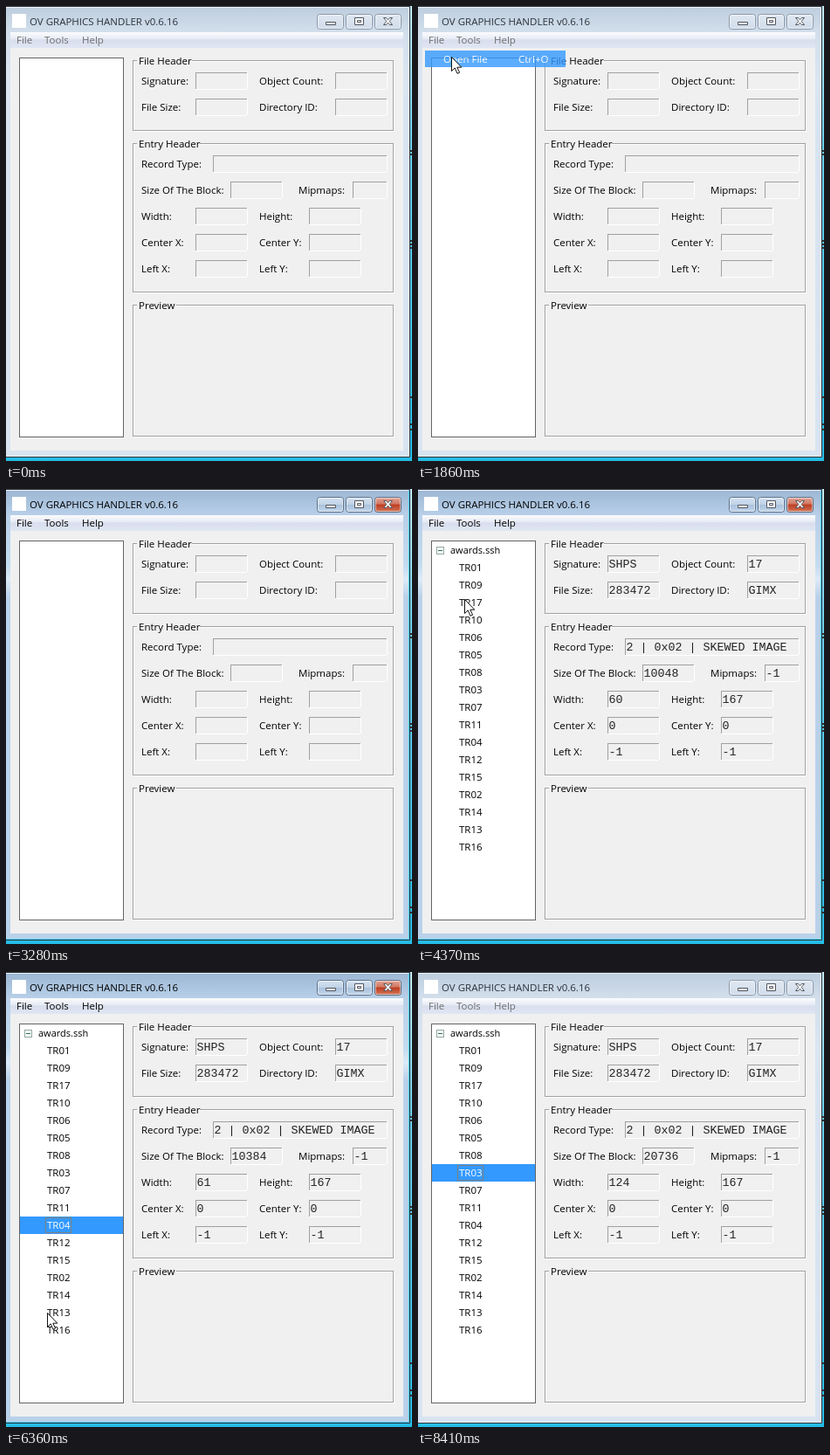
An HTML page for the animation above (8.48 s loop, 465x521 px).

```html
<!DOCTYPE html>
<html>
<head>
<meta charset="utf-8">
<style>
html, body { margin: 0; width: 100%; height: 100%; overflow: hidden; }
svg { display: block; }
text { font: 11.5px "Open Sans", "Noto Sans", sans-serif; white-space: pre; }
.mono { font: 13.33px "Liberation Mono", monospace; fill: #222; }
</style>
</head>
<body>
<svg id="stage" width="465" height="521" viewBox="0 0 465 521"></svg>
<script>
const LOOP = 8480, LOADED = 3740, REST = 110;
const ACTIVATE = 820, OPEN = 1020, CHOOSE = 1720, DIALOG = 1800, RETURN = 3280, LEAVE = 8400;
const stage = document.getElementById('stage');
const $ = id => document.getElementById(id);
const show = (id, on) => $(id).setAttribute('display', on ? 'inline' : 'none');

const rect = (x, y, w, h, fill, more = '') =>
  `<rect x="${x}" y="${y}" width="${w}" height="${h}" fill="${fill}" ${more}/>`;
const box = (x, y, w, h, stroke, fill = 'none', more = '') =>
  rect(x + .5, y + .5, w - 1, h - 1, fill, `stroke="${stroke}" ${more}`);
const line = (d, stroke) => `<path d="${d}" fill="none" stroke="${stroke}"/>`;
const text = (x, y, s, more = '') => `<text x="${x}" y="${y}" ${more}>${s}</text>`;
const gradient = (id, ...stops) => `<linearGradient id="${id}" x2="0" y2="1">` +
  stops.map(([at, c]) => `<stop offset="${at}" stop-color="${c}"/>`).join('') + '</linearGradient>';

const rows = ['01', '09', '17', '10', '06', '05', '08', '03', '07', '11', '04', '12', '15', '02', '14', '13', '16'];

// time, selected row, width, height
const picks = [
  [LOADED, -1, 60],
  [4640, 2, 128, 128],
  [5030, 6, 60],
  [5530, 10, 61],
  [6450, 16, 60],
  [6950, 7, 124]
];
const clicked = picks.slice(1);
const clicks = [ACTIVATE, OPEN, CHOOSE, ...clicked.map(p => p[0])];

// Block size: even row width, 16 byte header, padded to 16 bytes
const blockSize = (w, h) => Math.ceil(((w + w % 2) * h + 16) / 16) * 16;

// The pointer's stops: arrival time, x, y
const stops = [
  [0, 230, 530], [ACTIVATE, 22, 39], [1550, 38, 58], [1820, 38, 58], [2620, 480, 150],
  [LOADED, 480, 110], [4300, 53, 126],
  ...clicked.map(([t, row]) => [t, 47, 83 + 20 * row]),
  [7180, 143, 171], [7500, 440, -30], [8150, 432, 530], [LOOP, 432, 530]
];

const group = (y, h, title, gap) =>
  box(146, y + 1, 299, h, '#fff') + box(145, y, 299, h, '#a0a0a0') +
  rect(150, y - 2, gap, 5, '#f0f0f0') + text(152, y + 5, title);

let values = '';
function field(y, labelX, label, x, w, value, id = '') {
  values += text(x + 1.5, y, value, `class="mono" id="${id}"`);
  return text(labelX, y, label) + box(x, y - 14, w, 20, '#a0a0a0', '#f0f0f0') +
    line(`M${x} ${y + 5.5}h${w - .5}v-19.5`, '#fff');
}
const pair = (y, rightX, [label1, value1, id1], [label2, value2, id2]) =>
  field(y, 155, label1, 217, 60, value1, id1) + field(y, 290, label2, rightX, 60, value2, id2);

const form =
  pair(90, 377, ['Signature:', 'SHPS'], ['Object Count:', '17']) +
  pair(120, 377, ['File Size:', '283472'], ['Directory ID:', 'GIMX']) +
  field(185, 155, 'Record Type:', 237, 200, '2 | 0x02 | SKEWED IMAGE') +
  field(215, 155, 'Size Of The Block:', 257, 60, '', 'size') +
  field(215, 335, 'Mipmaps:', 397, 40, '-1') +
  pair(245, 347, ['Width:', '', 'width'], ['Height:', '', 'height']) +
  pair(275, 347, ['Center X:', '0'], ['Center Y:', '0']) +
  pair(305, 347, ['Left X:', '-1'], ['Left Y:', '-1']);

const button = (i, fill, edge) => box(356 + 33 * i, 9, 31, 18, edge, fill, 'rx="3"') +
  box(357 + 33 * i, 10, 29, 16, '#fff', 'none', 'rx="2" opacity=".5"');

const frame = (fill, face, close, edge, rim) =>
  rect(0, 0, 463, 517, fill) +
  line('M0 .5H462.5V516.5H0', '#2b3139') + line('M0 1.5H461', '#eef4fa') +
  line('M461.5 2V515.5H0', rim) +
  [face, face, close].map((f, i) => button(i, f, edge)).join('');

const menuItem = text(29, 65, 'Open File') + text(115, 65, 'Ctrl+O');

stage.innerHTML = `<defs>
  ${gradient('on', [0, '#9bb6d3'], [.06, '#b9d0e9'], [.17, '#c3dcf0'], [.2, '#dcebf8'], [.24, '#b9d1ea'])}
  ${gradient('off', [0, '#bdcddd'], [.06, '#d3dfec'], [.17, '#dbe6f2'], [.24, '#d8e4f1'])}
  ${gradient('faceOn', [0, '#d6e3f1'], [.5, '#bfd2e6'], [.5, '#a9c1dc'], [1, '#c3d7ec'])}
  ${gradient('faceOff', [0, '#e0e8f1'], [1, '#d0dcea'])}
  ${gradient('close', [0, '#e6a899'], [.45, '#d07660'], [.5, '#bc3d22'], [1, '#d5785a'])}
  ${gradient('menu', [0, '#fbfcfe'], [.4, '#e8ecf5'], [.5, '#d8deed'], [1, '#e0e6f3'])}
  ${gradient('side', [0, '#c4ecf8'], [.3, '#6fd0ef'], [1, '#25bce6'])}
</defs>
${rect(0, 0, 465, 521, 'url(#side)')}
${[165, 169, 268, 272, 276, 447, 478, 484].map(y => rect(463, y, 2, 2, '#333')).join('')}
<g id="idle">${frame('url(#off)', 'url(#faceOff)', 'url(#faceOff)', '#8b98a8', '#e6eef6')}</g>
<g id="active">${frame('url(#on)', 'url(#faceOn)', 'url(#close)', '#5f7289', '#3fd4f6')}</g>
<g fill="#fff" stroke="#50555e">
  <path d="M366.5 18.5h11v3h-11zM399.5 13.5h10v8h-10zM402.5 16.5h4v2h-4z"/>
  <path d="M432.5 13.5h3l2 2.3 2-2.3h3l-3.3 4 3.3 4h-3l-2-2.3-2 2.3h-3l3.3-4z"/>
</g>
${rect(7, 9, 16, 16, '#fff')}
${text(27, 21.5, 'OV GRAPHICS HANDLER v0.6.16', 'id="title"')}
${rect(5, 30, 450, 479, '#f0f0f0')}${rect(5, 30, 450, 18, 'url(#menu)')}
${rect(6, 31, 31, 16, '#c2dcf5', 'id="fileHot"')}
<g id="menuText">${text(12, 43, 'File')}${text(44, 43, 'Tools')}${text(87, 43, 'Help')}</g>
${box(15, 59, 120, 435, '#646464', '#fff')}
${group(62, 81, 'File Header', 63)}${group(157, 171, 'Entry Header', 72)}${group(342, 151, 'Preview', 45)}
${form}
<g id="content">
  ${values}
  <g id="pick">${rect(16, 0, 118, 20, '#3399ff')}${box(45, 1, 30, 18, '#c60', 'none', 'stroke-dasharray="1"')}</g>
  ${box(21, 66, 9, 9, '#92a8a0', '#f6faf8')}${rect(23, 70, 5, 1, '#2f6b60')}
  ${text(37, 74, 'awards.ssh', 'style="font-size:11px"')}
  <g id="rows">${rows.map((r, i) => text(47, 94 + 20 * i, 'TR' + r)).join('')}</g>
</g>
<g id="popup">
  <g id="sheet">${box(5, 48, 167, 25, '#979797', '#f1f1f1')}${menuItem}</g>
  <g id="hot" fill="#fff">${rect(8, 51, 161, 19, '#3399ff')}${menuItem}</g>
</g>
<g id="pointer">
  <circle id="ring" cy="1" r="12" fill="#e3dc1e" opacity=".6"/>
  <path d="M.5 .5V16.5l3.7-3.6 2.8 6.4 2.6-1.1-2.8-6h5z" fill="#fff" stroke="#111"/>
</g>`;

function pointerAt(t) {
  const i = stops.findIndex(s => s[0] > t);
  const [t0, x0, y0] = stops[i - 1], [t1, x1, y1] = stops[i];
  const k = Math.max(0, (t - t0 - REST) / (t1 - t0 - REST));
  return [x0 + (x1 - x0) * k, y0 + (y1 - y0) * k].map(Math.round);
}

function draw(t) {
  const active = t >= ACTIVATE && t < DIALOG || t >= RETURN && t < LEAVE;
  show('active', active);
  show('idle', !active);
  $('title').setAttribute('fill', active ? '#000' : '#2c333b');
  $('menuText').setAttribute('fill', active ? '#000' : '#6d6d6d');

  const open = t >= OPEN && t < DIALOG;
  show('fileHot', open);
  show('sheet', open);
  show('popup', t >= OPEN);
  show('hot', t >= 1350);
  $('hot').setAttribute('opacity', Math.min(1, Math.max(0, 1 - (t - DIALOG) / 300)));

  show('content', t >= LOADED);
  const [, row, width, height = 167] = picks.findLast(p => p[0] <= t) || picks[0];
  $('size').textContent = blockSize(width, height);
  $('width').textContent = width;
  $('height').textContent = height;
  show('pick', row >= 0);
  $('pick').setAttribute('transform', `translate(0 ${80 + 20 * row})`);
  [...$('rows').children].forEach((r, i) => r.setAttribute('fill', i === row ? '#fff' : '#000'));

  $('pointer').setAttribute('transform', `translate(${pointerAt(t)})`);
  show('ring', clicks.some(c => t >= c && t < c + 130));
}

function tick(now) {
  draw(now % LOOP);
  requestAnimationFrame(tick);
}
draw(0);
requestAnimationFrame(tick);
</script>
</body>
</html>
```
